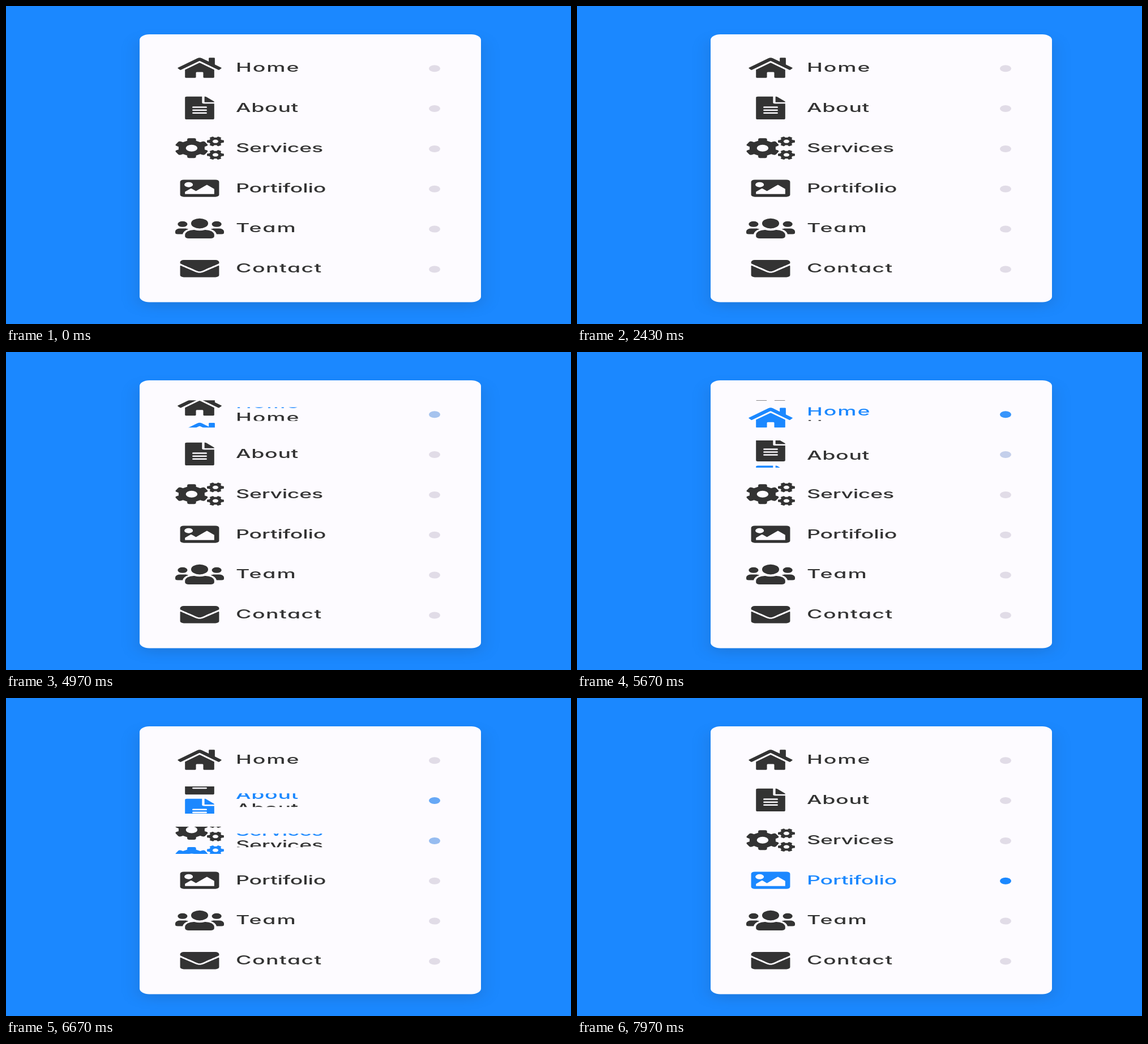
Animation of 998x561 px, one loop 8 s. Source, as an HTML page:

```html
<!DOCTYPE html>
<html lang="en">
<head>
<meta charset="utf-8">
<title>Menu</title>
<style>
html, body { margin: 0; width: 100%; height: 100%; overflow: hidden; background: #1b88ff; }
#stage { display: block; width: 100vw; height: 100vh; }
text { font: 500 21.4px Inter, "Open Sans", sans-serif; font-feature-settings: "cv11"; }
path { fill-rule: evenodd; }
</style>
</head>
<body>
<svg id="stage" viewBox="0 0 998 561" preserveAspectRatio="none">
  <defs>
    <filter id="soft" x="-20%" y="-20%" width="140%" height="140%">
      <feGaussianBlur stdDeviation="17 10"/>
    </filter>
  </defs>
  <rect width="998" height="561" fill="#1b88ff"/>
  <rect x="236" y="59" width="603" height="472" rx="17" ry="10" fill="#1c3f66" opacity=".2" filter="url(#soft)"/>
  <rect x="236" y="50" width="603" height="472.5" rx="17" ry="10" fill="#fdfbff"/>
  <g id="menu"></g>
</svg>
<script>
const LOOP = 8000, FADE = 700;
const STARTS = [4830, 5579, 6505, 7293];   // when each item becomes active
const PITCH = 70.85, ICON_H = 48, TEXT_H = 24;
const DARK = '#333', BLUE = '#1b88ff';
const DOT_OFF = [225, 220, 231], DOT_ON = [27, 136, 255];

const circle = (x, y, r) =>
  `M${x - r} ${y}a${r} ${r} 0 1 0 ${2 * r} 0a${r} ${r} 0 1 0 ${-2 * r} 0z`;

const bar = y =>
  `M108 ${y}h168a12 12 0 0 1 12 12v8a12 12 0 0 1-12 12h-168a12 12 0 0 1-12-12v-8a12 12 0 0 1 12-12z`;

function gear(cx, cy, size, turn) {
  const tooth = [[82, -29], [99, -29], [107, -26], [111, -18], [111, 18], [107, 26], [99, 29], [82, 29]];
  const pts = [];
  for (let k = 0; k < 6; k++) {
    const a = (turn + k * 60) * Math.PI / 180, c = Math.cos(a) * size, s = Math.sin(a) * size;
    for (const [x, y] of tooth) {
      pts.push(`${(cx + x * c - y * s).toFixed(1)} ${(cy + x * s + y * c).toFixed(1)}`);
    }
  }
  return `M${pts.join('L')}z` + circle(cx, cy, 38 * size);
}

const HOME = 'M280.4 148.3L96 300V464a16 16 0 0 0 16 16h112a16 16 0 0 0 16-16V368a16 16 0 0 1 16-16h64' +
  'a16 16 0 0 1 16 16v96a16 16 0 0 0 16 16h112a16 16 0 0 0 16-16V300L295.7 148.3a12.2 12.2 0 0 0-15.3 0z' +
  'M571.6 251.5L488 182.6V44a12 12 0 0 0-12-12h-56a12 12 0 0 0-12 12v72.7L318.5 43a48 48 0 0 0-61 0' +
  'L4.3 251.5a12 12 0 0 0-1.6 16.9l25.5 31A12 12 0 0 0 45.2 301l235.2-193.7a12.2 12.2 0 0 1 15.3 0' +
  'L530.9 301a12 12 0 0 0 16.9-1.6l25.5-31a12 12 0 0 0-1.7-16.9z';

const FILE = 'M224 136V0H24Q0 0 0 24V488Q0 512 24 512H360Q384 512 384 488V160H248Q224 160 224 136z' +
  'M256 0h6q10 0 17 7l98 98q7 7 7 17v6h-128z' + bar(224) + bar(288) + bar(352);

const COGS = gear(215, 256, 2, 30) + gear(528, 106, 1, 0) + gear(528, 406, 1, 0);

const IMAGE = 'M464 448H48a48 48 0 0 1-48-48V112a48 48 0 0 1 48-48h416a48 48 0 0 1 48 48v288a48 48 0 0 1-48 48z' +
  circle(112, 176, 56) +
  'M64 384h384V272l-87.5-87.5a12 12 0 0 0-17 0L208 320l-55.5-55.5a12 12 0 0 0-17 0L64 336z';

const USERS = circle(96, 160, 64) + circle(544, 160, 64) + circle(320, 144, 112) +
  'M576 256h-64c-17.6 0-33.5 7.1-45.1 18.6 40.3 22.1 68.9 62 75.1 109.4h66a32 32 0 0 0 32-32v-32a64 64 0 0 0-64-64z' +
  'M396.8 288h-8.3a157 157 0 0 1-137 0h-8.3A115.2 115.2 0 0 0 128 403.2V432a48 48 0 0 0 48 48h288' +
  'a48 48 0 0 0 48-48v-28.8A115.2 115.2 0 0 0 396.8 288z' +
  'M173.1 274.6C161.5 263.1 145.6 256 128 256H64a64 64 0 0 0-64 64v32a32 32 0 0 0 32 32h65.9' +
  'c6.3-47.4 34.9-87.3 75.2-109.4z';

const MAIL = 'M502.3 190.8c3.9-3.1 9.7-.2 9.7 4.7V400a48 48 0 0 1-48 48H48a48 48 0 0 1-48-48V195.6' +
  'c0-5 5.7-7.8 9.7-4.7 22.4 17.4 52.1 39.5 154.1 113.6 21.1 15.4 56.7 47.8 92.2 47.6' +
  ' 35.7.3 72-32.8 92.3-47.6 102-74.1 131.6-96.3 154-113.7z' +
  'M256 320c23.2.4 56.6-29.2 73.4-41.4 132.7-96.3 142.8-104.7 173.4-128.7 5.8-4.5 9.2-11.5 9.2-18.9v-19' +
  'a48 48 0 0 0-48-48H48a48 48 0 0 0-48 48v19c0 7.4 3.4 14.3 9.2 18.9' +
  ' 30.6 23.9 40.7 32.4 173.4 128.7 16.8 12.2 50.2 41.8 73.4 41.4z';

// label, letter spacing, icon width, icon path
const ITEMS = [
  ['Home', 1.1, 576, HOME],
  ['About', .4, 384, FILE],
  ['Services', -.15, 640, COGS],
  ['Portifolio', -.1, 512, IMAGE],
  ['Team', 1.1, 640, USERS],
  ['Contact', .85, 512, MAIL]
];

function add(parent, tag, attrs, content) {
  const el = document.createElementNS('http://www.w3.org/2000/svg', tag);
  for (const key in attrs) el.setAttribute(key, attrs[key]);
  if (content) el.textContent = content;
  parent.appendChild(el);
  return el;
}

// A clipped window holding a strip that slides inside it
function slider(x, y, width, height) {
  const view = add(menu, 'svg', { x, y, width, height, overflow: 'hidden' });
  return add(view, 'g', {});
}

const menu = document.getElementById('menu');

const rows = ITEMS.map(([label, gap, w, d], i) => {
  const cy = 109 + i * PITCH;
  const icons = slider(290, cy - 23.8, 104, ICON_H);
  const words = slider(400, cy - 11.5, 240, TEXT_H);
  [DARK, BLUE].forEach((fill, k) => {
    add(icons, 'path', {
      d, fill,
      transform: `translate(52 ${23.8 + k * ICON_H}) scale(.1345 .079) translate(${-w / 2} -256)`
    });
    add(words, 'text', {
      fill, 'letter-spacing': gap,
      transform: `translate(6 ${18.5 - k * TEXT_H}) scale(1.75 1)`
    }, label);
  });
  const dot = add(menu, 'ellipse', { cx: 757, cy: cy + 1.2, rx: 10, ry: 6 });
  return { icons, words, dot };
});

// cubic-bezier(.25, .1, .25, 1)
function ease(x) {
  if (x <= 0) return 0;
  if (x >= 1) return 1;
  const bez = (a, b, u) => 3 * a * u * (1 - u) ** 2 + 3 * b * u * u * (1 - u) + u ** 3;
  let lo = 0, hi = 1;
  for (let n = 0; n < 24; n++) {
    const mid = (lo + hi) / 2;
    if (bez(.25, .25, mid) < x) lo = mid; else hi = mid;
  }
  return bez(.1, 1, lo);
}

const reached = (t, i) => i < STARTS.length ? ease((t - STARTS[i]) / FADE) : 0;

function draw(t) {
  rows.forEach(({ icons, words, dot }, i) => {
    const p = reached(t, i) - reached(t, i + 1);
    icons.setAttribute('transform', `translate(0 ${-p * ICON_H})`);
    words.setAttribute('transform', `translate(0 ${p * TEXT_H})`);
    const rgb = DOT_OFF.map((c, k) => Math.round(c + (DOT_ON[k] - c) * p));
    dot.setAttribute('fill', `rgb(${rgb})`);
  });
}

const begin = performance.now();
function tick() {
  draw((performance.now() - begin) % LOOP);
  requestAnimationFrame(tick);
}
draw(0);
requestAnimationFrame(tick);
</script>
</body>
</html>
```
